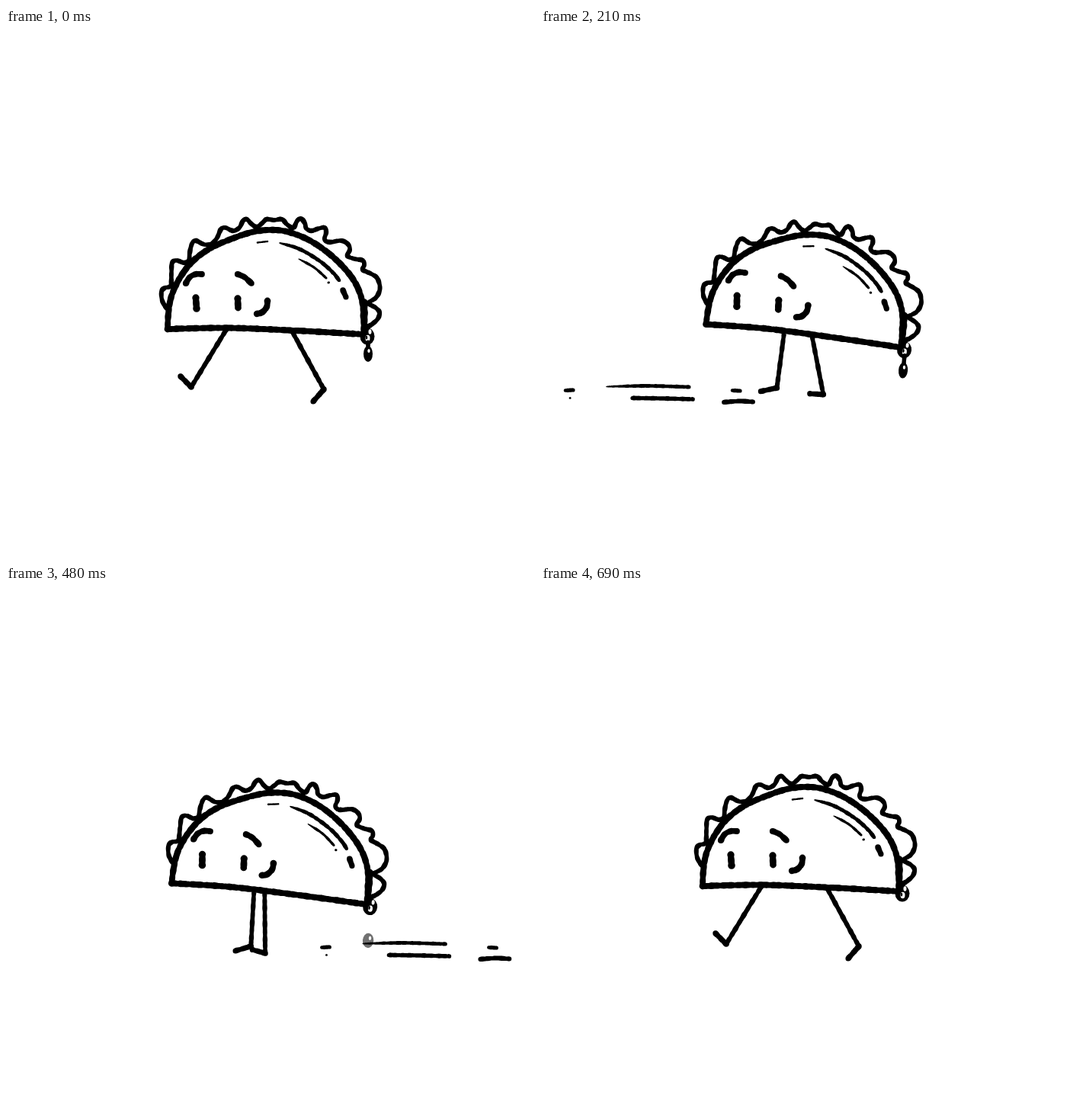
These frames come from a looping animation (694 by 694 pixels, 0.72 s). An HTML page with a canvas:

```html
<!DOCTYPE html>
<html lang="en">
<head>
<meta charset="utf-8">
<title>Walking taco</title>
<style>
html, body { margin: 0; width: 100%; height: 100%; overflow: hidden; background: #fff; }
canvas { display: block; }
</style>
</head>
<body>
<canvas id="stage" width="694" height="694"></canvas>
<script>
const ctx = document.getElementById('stage').getContext('2d');
const LOOP = 720, STEP = 30, STRIDE = 690, HALF = 330;
const PIVOT = { x: 341, y: 398 };

const clamp = v => Math.max(0, Math.min(1, v));
const ease = p => (1 - Math.cos(Math.PI * clamp(p))) / 2;
const mix = (a, b, q) => a + (b - a) * q;
const bend = (a, c, b, q) => a * (1 - q) ** 2 + 2 * q * (1 - q) * c + b * q * q;

const spline = (a, b, c, d, u) =>
  0.5 * (2 * b + (c - a) * u + (2 * a - 5 * b + 4 * c - d) * u * u + (3 * b - a - 3 * c + d) * u ** 3);

// Inked stroke through flat x, y pairs, with a slightly uneven edge.
function brush(coords, width, taper = 0) {
  const path = new Path2D(), n = coords.length / 2;
  const at = (i, k) => coords[2 * Math.max(0, Math.min(n - 1, i)) + k];
  let run = 0;
  for (let i = 0; i < n - 1; i++) {
    const len = Math.hypot(at(i + 1, 0) - at(i, 0), at(i + 1, 1) - at(i, 1));
    const count = Math.max(1, Math.ceil(len / 1.1));
    for (let j = 0; j <= count; j++) {
      const u = j / count, s = run + len * u;
      const [x, y] = [0, 1].map(k => spline(at(i - 1, k), at(i, k), at(i + 1, k), at(i + 2, k), u));
      const wobble = 1 + 0.1 * Math.sin(s * 0.53 + width) * Math.cos(s * 0.21);
      const r = width / 2 * wobble * (taper ? mix(0.35, 1, clamp(s / taper)) : 1);
      path.moveTo(x + r, y);
      path.arc(x, y, r, 0, 7);
    }
    run += len;
  }
  return path;
}

const shellArc = [212,395, 213,375, 217,352, 228,328, 245,306, 268,289, 295,277, 322,268, 345,265,
  368,267, 395,277, 420,293, 442,313, 458,334, 467,357, 469,380, 470,402];
const shellBase = [212,395, 290,393.5, 380,397, 470,402];
const lettuce = [211,368, 205,358, 204,346, 208,341, 216,338, 217,322, 218,308, 224,305, 234,308,
  240,304, 241,295, 244,283, 249,279, 260,284, 270,283, 277,275, 282,264, 288,262, 298,266,
  306,262, 311,253, 316,251, 322,257, 329,261, 336,256, 342,251, 352,252, 362,251, 369,258,
  377,262, 382,253, 387,250, 392,256, 394,263, 401,266, 410,263, 418,262, 420,268, 418,277,
  424,281, 440,279, 449,284, 451,291, 448,299, 458,303, 468,305, 470,311, 468,317, 478,322,
  486,327, 490,336, 490,345, 485,354, 476,361, 485,367, 490,373, 488,381, 481,388, 474,392];

const body = new Path2D();
[
  [shellArc, 8], [shellBase, 8], [lettuce, 6],
  [[470,360, 470,408], 9],
  [[236,335, 241,327, 249,323, 257,323], 7.5],
  [[304,323, 313,327, 322,335], 7.5],
  [[249,354, 250,368], 9], [[304,355, 304.5,367], 9],
  [[343,358, 342,366, 336,373, 329,375], 8],
  [[330,281.5, 343,280], 2.5],
  [[359,282, 385,290, 412,306, 429,321, 437,331], 5, 18],
  [[384,303, 404,314, 420,328], 3.5, 12],
  [[423,334, 423.5,334], 3],
  [[442,344, 446,353], 7]
].forEach(stroke => body.addPath(brush(...stroke)));

const shellFill = new Path2D();
for (let i = 0; i < shellArc.length; i += 2) shellFill.lineTo(shellArc[i], shellArc[i + 1]);

const streaks = new Path2D();
[
  [[32,475.5, 42,475], 5], [[38,485.5, 38.3,485.5], 2.6],
  [[86,470.5, 140,469.5, 194,471], 4.8, 40],
  [[120,485.5, 160,486, 199,487], 5.6],
  [[251,475.5, 261,476], 5], [[240,491, 260,489.5, 278,490.5], 6]
].forEach(stroke => streaks.addPath(brush(...stroke)));

// Pairs hold forward and back poses; ys also hold a middle control value.
const legs = [
  { fall: 400, hip: [[287, 384], [399, 406, 404]], ankle: [[243, 423], [471, 496, 470]], toe: [[229, 404], [457, 489, 476]] },
  { fall: 360, hip: [[377, 295], [401, 408, 393]], ankle: [[417, 265], [474, 484, 462]], toe: [[403, 241], [490, 494, 460]] }
];

function drawLeg(leg, t) {
  const q = Math.min(ease(t / HALF), ease((STRIDE - t) / leg.fall));
  const joint = ([xs, ys]) => [mix(...xs, q), bend(...ys, q)];
  const hip = joint(leg.hip), ankle = joint(leg.ankle), toe = joint(leg.toe);
  const root = hip.map((v, i) => mix(v, ankle[i], -0.06));
  ctx.fill(brush([...root, ...ankle], 6));
  ctx.fill(brush([...ankle, ...toe], 7));
}

function oval(x, y, rx, ry, color) {
  ctx.fillStyle = color;
  ctx.beginPath();
  ctx.ellipse(x, y, rx, ry, 0, 0, 7);
  ctx.fill();
}

function drawDrip(t) {
  oval(474, 404.5, 9.5, 11, '#000');
  oval(477.5, 398.5, 2, 3.2, '#fff');
  oval(474.5, 407, 3, 4.2, '#fff');
  oval(473, 406, 1.3, 2.6, '#000');

  const alpha = clamp((654 - t) / 312);
  if (!alpha) return;
  const fall = Math.min(90, 27 + 58 * (t / 570) ** 7 - 4 * clamp(1 - t / 90));
  const spread = clamp((t - 420) / 150), y = 404.5 + fall;
  ctx.globalAlpha = alpha;
  if (t < 350) {
    ctx.fillStyle = '#000';
    ctx.fill(brush([475, 412, 475, y], 5.5));
  }
  oval(475, y, mix(6, 9, spread), mix(10.5, 8.5, spread), '#000');
  ctx.globalAlpha = 1;
  oval(mix(476, 479, spread), y - mix(4, 2, spread), 1.7, 2.6, '#fff');
}

function drawBody(t) {
  const tilt = ease(t < HALF ? t / HALF : (STRIDE - t) / 360) * 7.4 * Math.PI / 180;
  const dip = t < HALF
    ? ease(t < 150 ? t / 150 : (HALF - t) / 180)
    : ease(t < 510 ? (t - HALF) / 180 : (STRIDE - t) / 180);
  ctx.save();
  ctx.translate(PIVOT.x + 5 * dip, PIVOT.y + 7.3 * dip);
  ctx.rotate(tilt);
  ctx.translate(-PIVOT.x, -PIVOT.y);
  ctx.fillStyle = '#fff';
  ctx.fill(shellFill);
  ctx.fillStyle = '#000';
  ctx.fill(body);
  drawDrip(t);
  ctx.restore();
}

function draw(now) {
  const t = Math.floor(now % LOOP / STEP) * STEP;
  ctx.fillStyle = '#fff';
  ctx.fillRect(0, 0, 694, 694);
  ctx.fillStyle = '#000';
  ctx.save();
  ctx.translate(1.416 * (t - 210), 0);
  ctx.fill(streaks);
  ctx.restore();
  legs.forEach(leg => drawLeg(leg, t));
  drawBody(t);
}

const start = performance.now();
function tick() {
  draw(performance.now() - start);
  requestAnimationFrame(tick);
}
tick();
</script>
</body>
</html>
```
